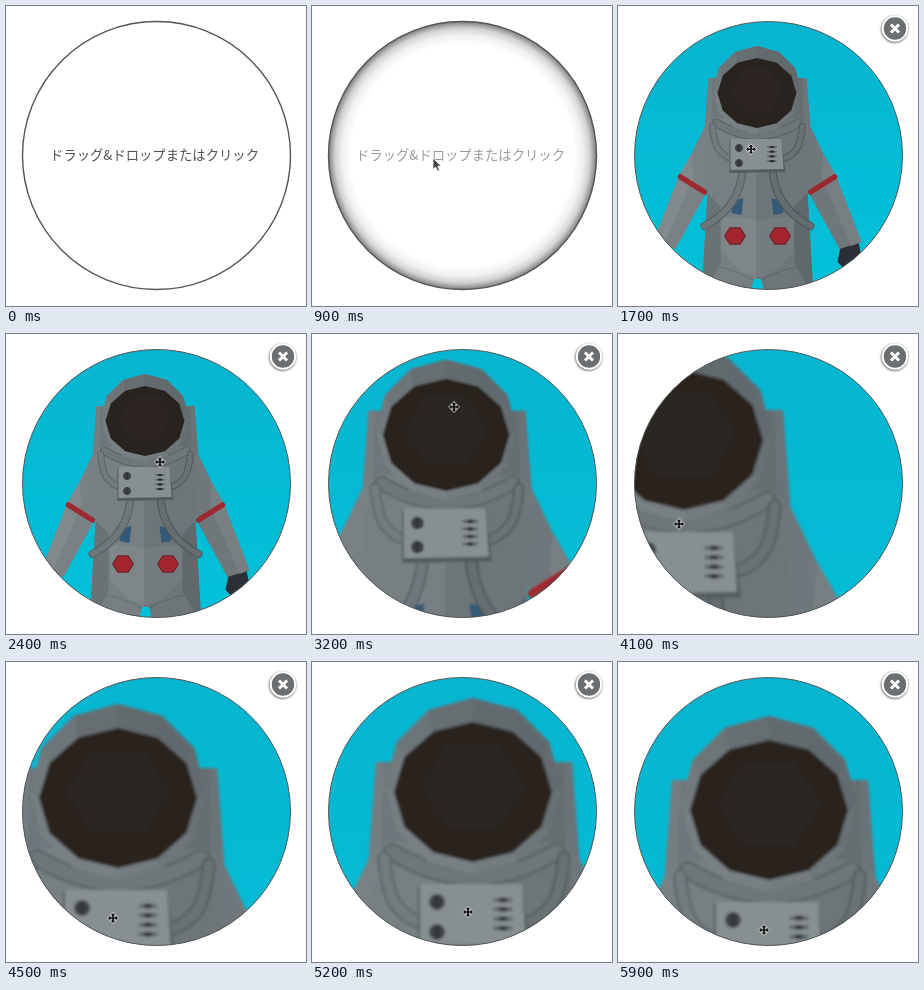
An HTML page that plays this animation: 300x300 px, repeating every 6 s.

```html
<!DOCTYPE html>
<html lang="ja">
<head>
<meta charset="utf-8">
<title>画像の切り抜き</title>
<style>
html, body { margin: 0; width: 100%; height: 100%; overflow: hidden; background: #fff; }
svg { display: block; width: 100vw; height: 100vh; }
text { font: 13.333px "Noto Sans CJK JP", "Noto Sans CJK", sans-serif; text-anchor: middle; }
</style>
</head>
<body>
<svg viewBox="0 0 300 300">
  <defs>
    <clipPath id="round"><circle cx="150.5" cy="149.5" r="134"/></clipPath>
    <radialGradient id="inset">
      <stop offset=".83" stop-color="#000" stop-opacity="0"/>
      <stop offset=".9" stop-color="#000" stop-opacity=".06"/>
      <stop offset=".95" stop-color="#000" stop-opacity=".18"/>
      <stop offset="1" stop-color="#000" stop-opacity=".5"/>
    </radialGradient>
    <linearGradient id="sky" x2="0" y2="1">
      <stop offset="0" stop-color="#08b3cf"/>
      <stop offset="1" stop-color="#00c3da"/>
    </linearGradient>
    <filter id="soft" x="-10%" y="-10%" width="120%" height="120%"><feGaussianBlur stdDeviation=".7"/></filter>
    <filter id="shade" x="-50%" y="-50%" width="200%" height="200%"><feGaussianBlur stdDeviation="1.3"/></filter>
  </defs>

  <g id="prompt">
    <circle id="glow" cx="150.5" cy="149.5" r="134" fill="url(#inset)"/>
    <text id="label" x="148.5" y="154">ドラッグ&amp;ドロップまたはクリック</text>
  </g>

  <g id="photo" clip-path="url(#round)">
    <g id="scene">
      <rect x="-60" y="-20" width="420" height="360" fill="url(#sky)"/>
      <g id="astronaut" transform="translate(139.5)" filter="url(#soft)"></g>
    </g>
  </g>
  <circle id="ring" cx="150.5" cy="149.5" r="134" fill="none" stroke="#555"/>

  <g id="close">
    <circle cx="276.6" cy="23.3" r="13.4" opacity=".6" filter="url(#shade)"/>
    <circle cx="277" cy="22.5" r="12.2" fill="#6c6f71" stroke="#fff" stroke-width="2"/>
    <path d="M273 18.5l8 8m0-8l-8 8" stroke="#fff" stroke-width="3"/>
  </g>

  <path id="arrow" d="M0 0V11.5L2.7 9L4.6 13.2L6.6 12.3L4.8 8.2H8.2Z" fill="#444" stroke="#fff" stroke-width=".8"/>
  <path id="move" fill="#111" stroke="#fff" stroke-width="1.2" paint-order="stroke"/>
</svg>
<script>
const $ = id => document.getElementById(id);
const gray = v => `rgb(${v},${v + 8},${v + 12})`;
let layer = $('astronaut');

function add(tag, attrs, parent = layer) {
  const node = document.createElementNS('http://www.w3.org/2000/svg', tag);
  for (const name in attrs) node.setAttribute(name, attrs[name]);
  return parent.appendChild(node);
}
const poly = (points, fill) => add('polygon', { points, fill });
const line = (d, stroke, width) => add('path', {
  d, stroke, 'stroke-width': width, fill: 'none', 'stroke-linecap': 'round'
});
const tube = (d, v, width) => {
  line(d, gray(v - 24), width + 2);
  line(d, gray(v), width);
};
const ngon = (n, cx, cy, rx, ry, turn = 0) => Array.from({ length: n }, (_, i) => {
  const a = turn + i * 2 * Math.PI / n;
  return [cx + rx * Math.cos(a), cy + ry * Math.sin(a)];
});

// Draws a part on both sides of the body axis, x measured outwards.
function mirrored(draw) {
  const body = layer;
  for (const side of [-1, 1]) {
    layer = add('g', { transform: `scale(${side} 1)` }, body);
    draw(v => gray(v - side * 5), v => v - side * 5);
  }
  layer = body;
}

function drawBody() {
  mirrored(tone => {
    poly('0,72 49,72 53,125 0,125', tone(106));
    poly('45,72 49,72 53,125 46,125', tone(112));
  });
  poly('83,241 101,236 106,262 92,268 80,256', '#2c3036');
  mirrored(tone => {
    poly('46,114 53,121 66,148 78,169 104,236 82,243 53,190 40,150', tone(116));
    poly('66,148 78,169 104,236 94,240 64,172', tone(124));
    line('M53 186L77 171', '#9d2930', 5.5);
  });
  mirrored((tone, level) => {
    poly('-1,112 44,112 52,140 50,187 52,222 56,290 7,290 4,273 -1,273', tone(114));
    poly('50,187 37,200 37,258 56,290 52,222', tone(101));
    poly('-1,214 36,210 36,246 18,264 -1,272', tone(121));
    line('M4 274Q26 261 54 259', tone(98), 1.2);
    poly('14,192 25,195 26,207 16,209', '#345a78');
    tube('M15 162C16 186 26 206 53 220', level(106), 6);
    poly(ngon(6, 22.5, 230, 11, 10), '#6e2429');
    poly(ngon(6, 22.5, 230, 9.5, 8.6), '#a3262e');
  });
  tube('M-41 117Q0 142 41 117', 110, 7);
  mirrored((tone, level) => tube('M45 120C43 138 41 146 28 152', level(110), 5));
}

function drawPanel() {
  poly('-28,134 24,134 28,166 -28,167', gray(84));
  poly('-27,133 24,133 26,163 -27,164', gray(135));
  for (const y of [142, 157]) {
    poly(ngon(12, -18.5, y, 4, 4), '#3b4144');
    line(`M-18.5 ${y - 3}v6`, '#202426', .7);
  }
  for (let y = 141; y < 157; y += 4.7) {
    line(`M10.5 ${y}h8`, '#555c60', 1.6);
    line(`M13.5 ${y}h2`, '#282c2e', 2.2);
  }
}

function drawHelmet() {
  const outer = ngon(12, -.5, 84, 44, 44);
  const inner = ngon(12, -.5, 87, 39.5, 35);
  poly(outer, gray(110));
  outer.forEach((point, i) => {
    const j = (i + 1) % 12, a = (i + .5) * Math.PI / 6;
    poly([point, outer[j], inner[j], inner[i]], gray(Math.round(109 - 8 * Math.cos(a) + 9 * Math.sin(a))));
  });
  poly(inner, '#29231f');
  poly(ngon(6, -.5, 84, 26, 24), '#2c2521');
}

// [time, x, y]
const pointerKeys = [
  [300, 100, 312], [900, 121, 152], [1300, 121, 152], [2400, 154, 128],
  [2800, 142, 73], [3500, 142, 73], [3600, 126, 90], [4100, 61, 190],
  [4700, 130, 289], [5200, 156, 250], [5900, 146, 268]
];
const ramp = (t, from, to) => Math.min(1, Math.max(0, (t - from) / (to - from)));

function pointerAt(t) {
  const i = Math.max(1, pointerKeys.findIndex(key => key[0] >= t));
  const [t0, x0, y0] = pointerKeys[i - 1], [t1, x1, y1] = pointerKeys[i];
  const k = ramp(t, t0, t1);
  return [x0 + (x1 - x0) * k, y0 + (y1 - y0) * k];
}

// Zooms around a fixed point, then follows the drag down to the lower edge.
function cameraAt(t, px, py) {
  const zoom = ramp(t, 2700, 3530);
  const dragging = t >= 3600;
  const x = -147 * zoom + (dragging ? px - 126 : 0);
  const y = -64 * zoom + (dragging ? Math.max(-4, py - 230) : 0);
  return `translate(${x} ${y}) scale(${1 + zoom})`;
}
const show = (id, on) => $(id).setAttribute('display', on ? 'inline' : 'none');

function render(time) {
  const t = Math.floor(time % 6000 / 100) * 100;
  const loaded = t >= 1300;
  const hover = ramp(t, 500, 800);
  const shade = Math.round(80 + 75 * hover);
  const [px, py] = pointerAt(t);

  show('prompt', !loaded);
  show('photo', loaded);
  show('close', loaded);
  show('arrow', !loaded && t >= 300);
  show('move', loaded);
  $('glow').setAttribute('opacity', hover);
  $('label').setAttribute('fill', `rgb(${shade},${shade},${shade})`);
  $('ring').setAttribute('stroke-width', loaded ? 1 : 1.4);
  $('scene').setAttribute('transform', cameraAt(t, px, py));
  $('arrow').setAttribute('transform', `translate(${px} ${py})`);
  $('move').setAttribute('transform', `translate(${px} ${py}) scale(.85)`);
}

$('move').setAttribute('d', 'M0-6L3-3H1V-1H3V-3L6 0L3 3V1H1V3H3L0 6L-3 3H-1V1H-3V3L-6 0L-3-3V-1H-1V-3H-3Z');
drawBody();
drawPanel();
drawHelmet();
const start = performance.now();
function tick() {
  render(performance.now() - start);
  requestAnimationFrame(tick);
}
tick();
</script>
</body>
</html>
```
